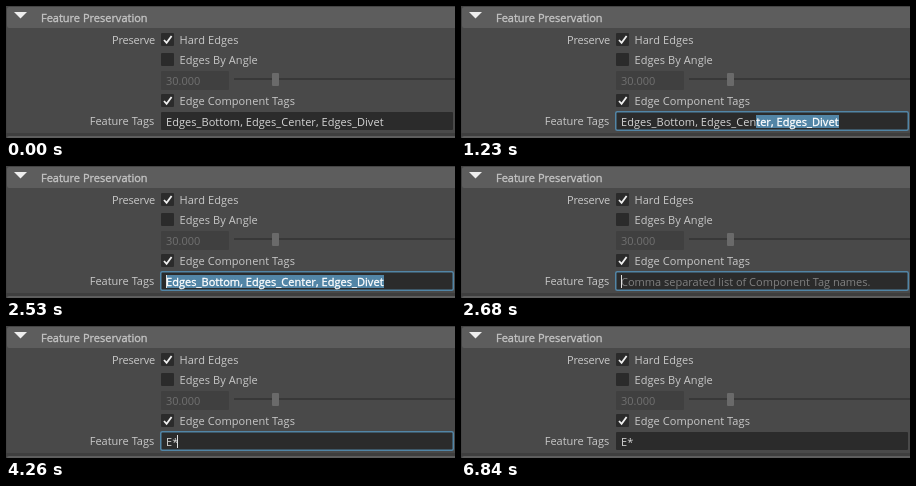
An HTML page for the animation above (6910 ms loop, 449 px wide and 132 px high).

```html
<!DOCTYPE html>
<html lang="en">
<head>
<meta charset="utf-8">
<title>Feature Preservation</title>
<style>
  html, body { margin: 0; width: 100%; height: 100%; overflow: hidden; background: #444; }
  svg { display: block; width: 449px; height: 132px; }
  text { font: 11px "Open Sans", "Noto Sans", sans-serif; fill: #c8c8c8; white-space: pre; }
  .title { fill: #c4c4c4; stroke: #c4c4c4; stroke-width: .35; }
  .option { letter-spacing: .07px; }
  .off { fill: #707070; }
  .dark { fill: #2b2b2b; }
  .bar { fill: #5d5d5d; }
  .tick { fill: none; stroke: #f0f0f0; stroke-width: 1.8; }
  #value { fill: #d4d4d4; letter-spacing: .04px; }
  #picked { fill: #fff; stroke: #fff; stroke-width: .3; }
  #hint { fill: #808080; }
  #mark { fill: #5285a6; }
  #focus { fill: #2b2b2b; stroke: #5285a6; stroke-width: 1.5; }
  #caret { fill: #e0e0e0; }
</style>
</head>
<body>
<svg viewBox="0 0 449 132">
  <defs>
    <g id="box">
      <rect class="dark" width="13" height="13" rx="1"/>
    </g>
    <g id="checked">
      <use href="#box"/>
      <path class="tick" d="M3 7L5.6 9.8L10.6 3"/>
    </g>
  </defs>

  <rect width="449" height="132" fill="#444"/>
  <rect x="1" y="21" width="460" height="106" fill="#494949"/>
  <rect class="bar" x="1" y="1" width="460" height="21" rx="2"/>
  <rect y="127" width="449" height="3" fill="#3e3e3e"/>
  <rect class="bar" x="1" y="130" width="460" height="21" rx="2"/>
  <path d="M8 6H21L14.5 12.5Z" fill="#eee"/>
  <text class="title" x="35" y="16">Feature Preservation</text>

  <text x="106" y="38" letter-spacing="-.2">Preserve</text>
  <use href="#checked" x="155" y="27"/>
  <text class="option" x="173.5" y="38">Hard Edges</text>

  <use href="#box" x="155" y="47"/>
  <text class="option" x="173.5" y="58">Edges By Angle</text>

  <rect x="155" y="65" width="68" height="19" rx="1" fill="#404040"/>
  <text class="off" x="160" y="79">30.000</text>
  <rect x="228" y="72" width="230" height="2" fill="#383838"/>
  <rect x="266" y="67" width="7" height="13" rx="1" fill="#6a6a6a"/>

  <use href="#checked" x="155" y="88"/>
  <text class="option" x="173.5" y="99">Edge Component Tags</text>

  <text x="116" y="119" text-anchor="middle">Feature Tags</text>
  <rect class="dark" x="155" y="106" width="292" height="18" rx="1"/>
  <rect id="focus" x="154.75" y="105.75" width="292.5" height="18.5" rx="1.5"/>
  <rect id="mark" y="109" height="13"/>
  <text id="hint" x="160" y="120">Comma separated list of Component Tag names.</text>
  <text id="value" x="160" y="120"><tspan id="plain"></tspan><tspan id="picked"></tspan></text>
  <rect id="caret" y="109" width="1" height="13"/>
</svg>
<script>
  const LOOP = 6910, LEFT = 160, RIGHT = 378;
  const TAGS = "Edges_Bottom, Edges_Center, Edges_Divet";
  const FOCUS_IN = 930, CLEAR = 2680, TYPE_E = 3460, TYPE_STAR = 4260, FOCUS_OUT = 6840;

  // [time, index of the first selected character] while dragging leftwards
  const DRAG = [[1150, 31], [1230, 23], [1300, 18], [1370, 13],
                [1450, 8], [1520, 3], [1590, 1], [1670, 0]];
  const CARET_OFF = [[1150, 1670], [2030, 2530], [3330, TYPE_E],
                     [4190, TYPE_STAR], [5250, 5760], [6260, 6760]];

  const el = id => document.getElementById(id);
  const show = (id, on) => el(id).setAttribute("visibility", on ? "visible" : "hidden");

  function textAt(t) {
    if (t < CLEAR) return TAGS;
    if (t < TYPE_E) return "";
    return t < TYPE_STAR ? "E" : "E*";
  }

  function selectionStart(t) {
    let start = TAGS.length;
    for (const [time, index] of DRAG) if (t >= time) start = index;
    return start;
  }

  function caretX(text, start) {
    if (text !== TAGS) return [LEFT, 166, 171][start];
    if (start === 0) return LEFT;
    if (start === TAGS.length) return RIGHT - 1;
    return Math.round(LEFT + el("plain").getComputedTextLength());
  }

  function draw(t) {
    const text = textAt(t);
    const focused = t >= FOCUS_IN && t < FOCUS_OUT;
    const start = t < CLEAR ? selectionStart(t) : text.length;
    el("plain").textContent = text.slice(0, start);
    el("picked").textContent = text.slice(start);

    const x = caretX(text, start);
    el("mark").setAttribute("x", x);
    el("mark").setAttribute("width", RIGHT - x);
    el("caret").setAttribute("x", x);

    show("focus", focused);
    show("hint", text === "");
    show("mark", start < text.length);
    show("caret", focused && !CARET_OFF.some(([a, b]) => t >= a && t < b));
  }

  const begin = performance.now();
  function tick() {
    draw((performance.now() - begin) % LOOP);
    requestAnimationFrame(tick);
  }
  tick();
</script>
</body>
</html>
```
